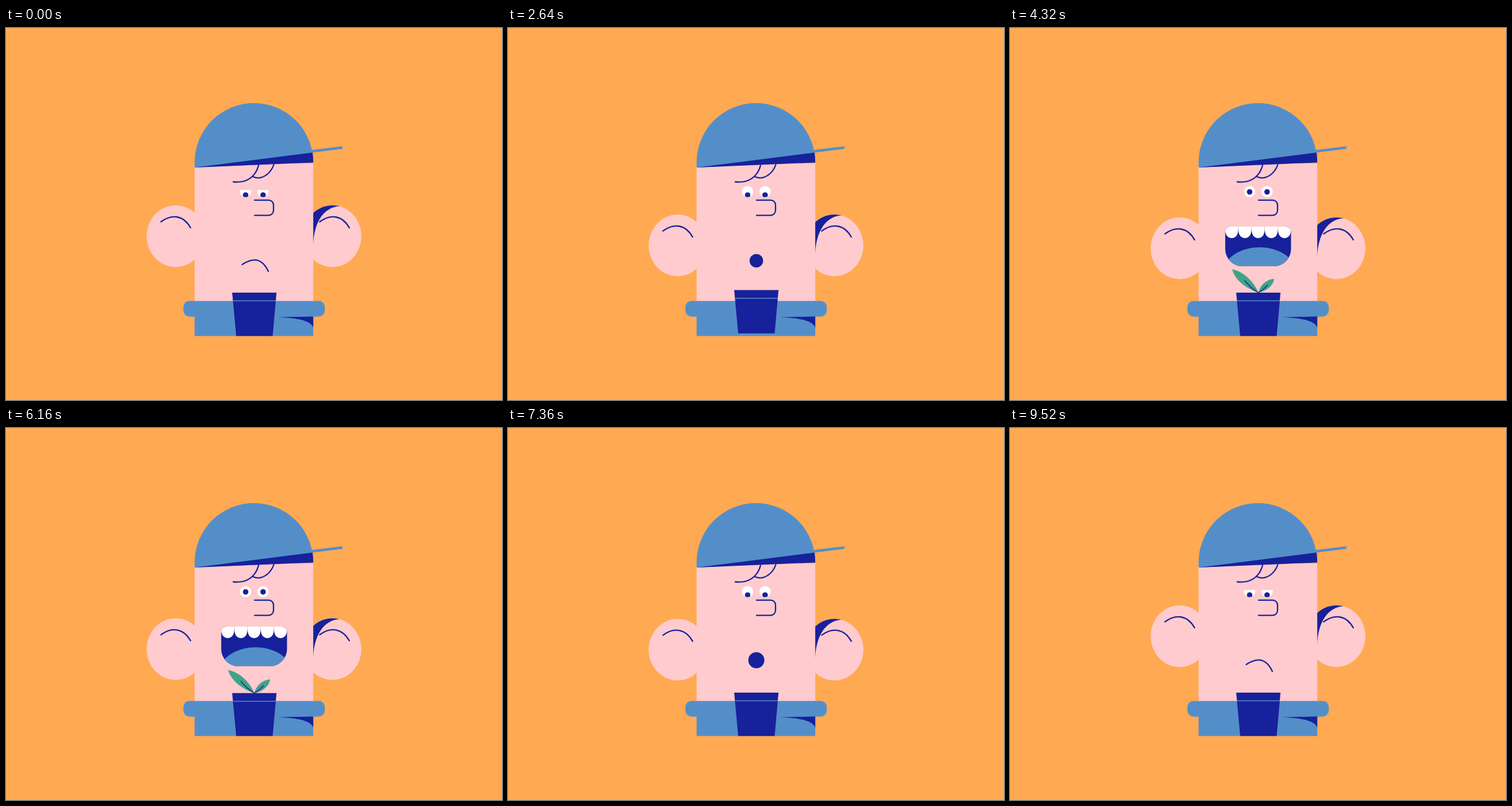
Write an HTML page that moves like this. It is 864 px wide and 648 px high and loops after 9.6 s.

```html
<!DOCTYPE html>
<html lang="en">
<head>
<meta charset="utf-8">
<title>Boy and plant pot</title>
<style>
  html, body { margin: 0; width: 100%; height: 100%; overflow: hidden; background: #ffa952; }
  svg { display: block; width: 100vw; height: 100vh; }
  .blue { fill: #548ec9; }
  .navy { fill: #17219b; }
  .skin { fill: #ffcbce; }
  .white { fill: #fff; }
  .leaf { fill: #3fa387; }
  .line { fill: none; stroke: #17219b; stroke-width: 2.3; stroke-linecap: round; stroke-linejoin: round; }
  .vein { fill: none; stroke: #17219b; stroke-width: 1.4; stroke-linecap: round; }
</style>
</head>
<body>
<svg viewBox="0 0 864 648">
  <defs>
    <clipPath id="earClip"><ellipse cx="568.5" cy="362.7" rx="50.5" ry="53.7"/></clipPath>
    <clipPath id="lidClip"><rect id="lid" x="-14" width="28" height="30"/></clipPath>
    <clipPath id="eyeClip"><circle r="9.8"/></clipPath>
    <clipPath id="mouthClip"><path id="mouthMask"/></clipPath>
    <path id="fold" d="M270 337.5C289 323.5 309 326 321.5 348"/>
  </defs>

  <g id="ears">
    <ellipse class="skin" cx="295.5" cy="362.7" rx="50.5" ry="53.7"/>
    <ellipse class="skin" cx="568.5" cy="362.7" rx="50.5" ry="53.7"/>
    <path class="navy" clip-path="url(#earClip)" d="M581 310.5C555 312 537 335 535 378L525 378V300H581Z"/>
  </g>

  <rect class="skin" x="328.5" y="236" width="206.7" height="256"/>

  <g id="folds" class="line">
    <use href="#fold"/>
    <use href="#fold" x="276.5"/>
  </g>

  <g class="line">
    <path d="M396 268C419 270.5 435.5 259.5 440.5 237"/>
    <path d="M430 259C445 266 461 254 466.5 238"/>
  </g>
  <path class="blue" d="M328.5 243V234.2A103.35 103.35 0 0 1 535.2 234.2Z"/>
  <path class="navy" d="M328.5 243L534 217Q535.2 225 535.2 234.3Z"/>
  <path class="blue" d="M532.5 212.5L586 206V210.5L533.8 217Z"/>

  <g id="eyes"></g>
  <path class="line" d="M433 299.8H457.5A8.5 8.5 0 0 1 466 308.3V317.8A8.5 8.5 0 0 1 457.5 326.3H433"/>

  <path id="frown" class="line" d="M411.5 412C425 403 444 396 457 424"/>
  <g id="mouth">
    <path id="mouthShape" class="navy"/>
    <g id="inside" clip-path="url(#mouthClip)">
      <g id="tongue"><ellipse class="blue" cy="12" rx="64" ry="45"/></g>
      <g id="teeth" class="white"></g>
    </g>
  </g>

  <rect class="blue" x="328.5" y="490" width="206.7" height="46.5"/>
  <rect class="blue" x="309" y="475.5" width="246.3" height="27.2" rx="10.5"/>
  <path class="navy" d="M474 503.8L535.2 502.6V522C531 509 505 505 474 503.8Z"/>

  <g id="pot">
    <g id="plant">
      <path class="leaf" d="M0 0C-7 -18 -25 -36.8 -45.5 -40.5C-40 -20 -18 -6 0 0Z"/>
      <path class="leaf" d="M0 0C3 -12.5 14 -23.2 27.5 -24C25.8 -11 13 -2.3 0 0Z"/>
      <path class="vein" d="M0 0Q-13 -8 -23.5 -21M0 0Q9 -5 16 -13"/>
    </g>
    <path class="navy" d="M394 461H471.2L464.5 536.5H401Z"/>
    <path d="M395.5 475.3H469.8" stroke="#548ec9" stroke-width="1.6"/>
  </g>
</svg>

<script>
const LOOP = 9600, STEP = 40;
const POP = 3160, SWALLOW = 6440;
const $ = id => document.getElementById(id);
const lerp = (a, b, k) => a + (b - a) * k;

// Timing helpers: each takes the time, a start and a length in ms.
const span = (t, at, length) => Math.min(1, Math.max(0, (t - at) / length));
const move = (t, at, length) => {
  const k = span(t, at, length);
  return k * k * (3 - 2 * k);
};
const pulse = (t, at, length) => Math.sin(Math.PI * span(t, at, length));
const during = (t, from, to, length) => move(t, from, length) - move(t, to, length);
const spring = (t, at, length) => {
  const k = span(t, at, length);
  return 1 - Math.exp(-6 * k) * Math.cos(9 * k) * (1 - k);
};

function place(id, transform) {
  $(id).setAttribute('transform', transform);
}

function show(id, visible) {
  $(id).style.display = visible ? '' : 'none';
}

const EYES = [417.4, 447.8];
$('eyes').innerHTML = EYES.map(() => `
  <g class="eye"><g clip-path="url(#lidClip)">
    <circle class="white" r="9.8"/>
    <g clip-path="url(#eyeClip)"><circle class="pupil navy" r="4.8"/></g>
  </g></g>`).join('');
const eyes = [...document.querySelectorAll('.eye')];
const pupils = [...document.querySelectorAll('.pupil')];

const TEETH = 5, TOOTH = 23;
$('teeth').innerHTML = Array.from({ length: TEETH }, (_, i) =>
  `<path transform="translate(${(i - (TEETH - 1) / 2) * TOOTH} 0)"
    d="M-11.5 -1V4C-11.3 15 -6.5 20 0 20S11.3 15 11.5 4V-1Z"/>`).join('');

function setEars(t) {
  const sag = 16 * move(t, 1200, 600) + 5 * move(t, POP, 400) + 2.5 * span(t, 4320, 3020);
  const shift = `translate(0 ${sag * (1 - move(t, 7340, 620))})`;
  place('ears', shift);
  place('folds', shift);
}

function setEyes(t) {
  const awake = move(t, 900, 260) - move(t, 9080, 440);
  const blink = pulse(t, 480, 240) + pulse(t, SWALLOW, 240);
  const lookUp = during(t, POP, SWALLOW, 160) - during(t, 5000, 5560, 160) + during(t, 8080, 8480, 160);
  const sy = 1 + 0.2 * pulse(t, 1080, 640) + 0.1 * pulse(t, POP, 320);
  const sx = 1 - (sy - 1) * 0.15;

  $('lid').setAttribute('y', lerp(lerp(-2.8, -10.5, awake), 10, blink));
  EYES.forEach((x, i) => {
    eyes[i].setAttribute('transform', `translate(${x} 285) scale(${sx} ${sy})`);
    pupils[i].setAttribute('cy', lerp(6, 0.5, lookUp));
  });
}

function setMouth(t) {
  const round = t >= 2520 && t < 8960;
  show('frown', !round);
  show('mouth', round);
  if (!round) return;

  // A circle that widens into a box with rounded corners.
  const open = during(t, 3200, SWALLOW, 200);
  const w = lerp(28, 114.6, open), cx = lerp(432.6, 432.2, open);
  const top = lerp(390.5, 346, open), bottom = lerp(418.5, 415, open);
  const rt = lerp(14, 9, open), rb = lerp(14, 30, open);
  const l = cx - w / 2, r = cx + w / 2;
  const arc = (rad, x, y) => `A${rad} ${rad} 0 0 1 ${x} ${y}`;
  const d = `M${l + rt} ${top}H${r - rt}${arc(rt, r, top + rt)}V${bottom - rb}` +
    `${arc(rb, r - rb, bottom)}H${l + rb}${arc(rb, l, bottom - rb)}V${top + rt}${arc(rt, l + rt, top)}Z`;
  $('mouthShape').setAttribute('d', d);
  $('mouthMask').setAttribute('d', d);

  const grow = lerp(0.55, 1, move(t, 2520, 200));
  place('mouth', `translate(432.6 ${404.5 + 6 * (1 - grow)}) scale(${grow}) translate(-432.6 -404.5)`);
  show('inside', open > 0);
  place('teeth', `translate(${cx} ${top}) scale(${w / 114.6} ${open})`);
  place('tongue', `translate(${cx + 2.5} ${bottom}) scale(${open})`);
}

const HOPS = [1000, 2480, POP, 6280, 6960];

function setPot(t) {
  const lift = HOPS.reduce((sum, at) => sum + 4.6 * pulse(t, at, 280), 0);
  const squash = 1 - 0.012 * pulse(t, 6080, 240);
  place('pot', `translate(0 ${536.5 * (1 - squash) - lift}) scale(1 ${squash})`);

  const size = spring(t, POP + 80, 1000) - move(t, 6280, 200);
  show('plant', size > 0);
  place('plant', `translate(432.5 461) scale(${size})`);
}

function draw(t) {
  setEars(t);
  setEyes(t);
  setMouth(t);
  setPot(t);
}

const start = performance.now();
function tick() {
  const t = (performance.now() - start) % LOOP;
  draw(Math.floor(t / STEP) * STEP);
  requestAnimationFrame(tick);
}
tick();
</script>
</body>
</html>
```
